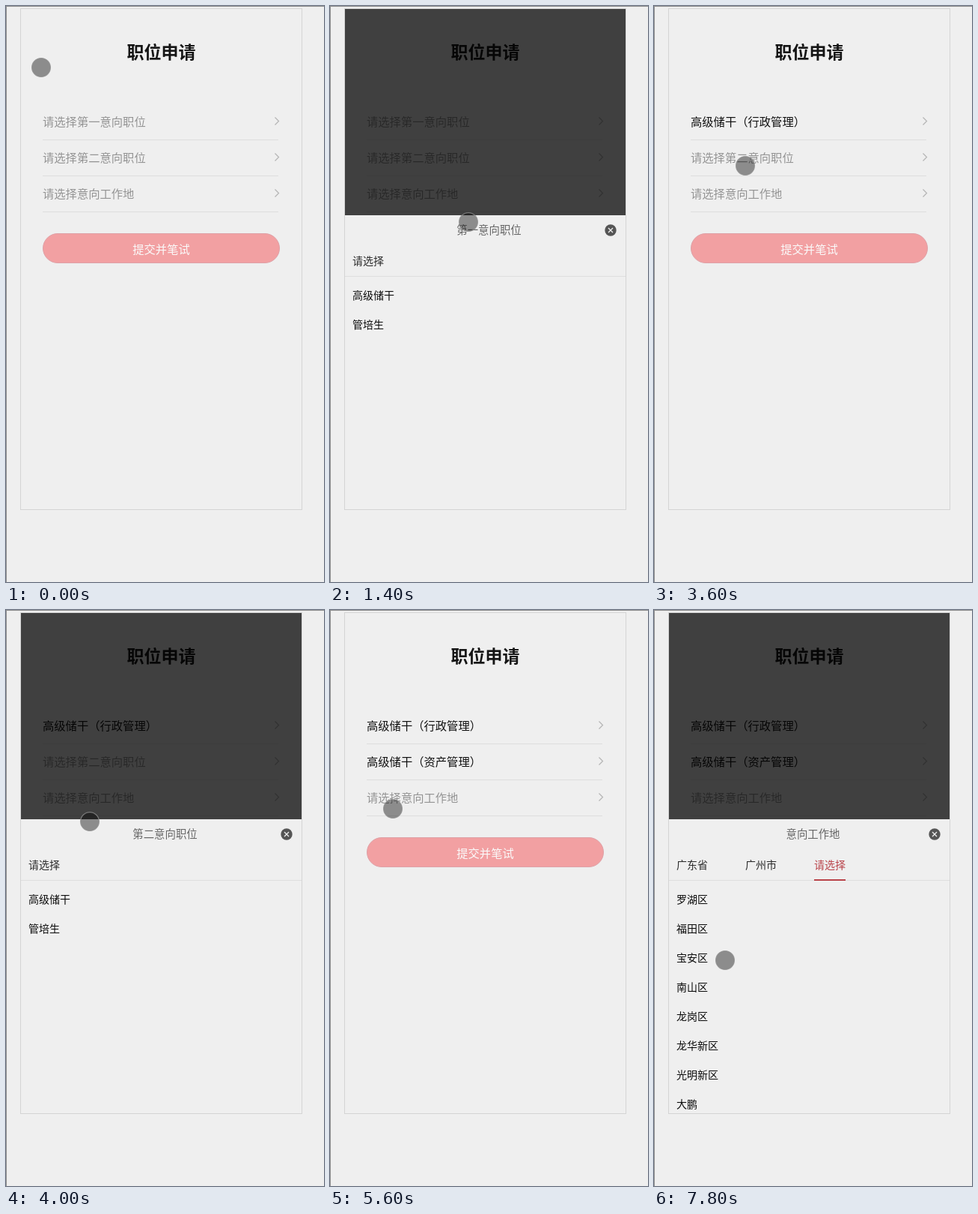
These frames come from a looping animation (425 px wide and 768 px high, 8 s). An HTML page:

```html
<!DOCTYPE html>
<html lang="zh-CN">
<head>
<meta charset="utf-8">
<title>职位申请</title>
<style>
  html, body { margin: 0; width: 100%; height: 100%; overflow: hidden; background: #efefef; }
  svg { display: block; width: 425px; height: 768px; font-family: "Noto Sans CJK SC", "Noto Sans CJK", sans-serif; }
</style>
</head>
<body>
<svg id="stage" viewBox="0 0 425 768">
  <defs><clipPath id="frame"><rect x="20" y="4" width="375" height="667"/></clipPath></defs>
  <rect width="425" height="768" fill="#efefef"/>
  <path d="M0 .5H425M.5 0V768" stroke="#8e8e8e"/>
  <g id="form"></g>
  <g id="picker" clip-path="url(#frame)"></g>
  <rect x="19.5" y="3.5" width="376" height="668" fill="none" stroke="#d4d4d4"/>
  <circle id="touch" r="12.4" fill="#000" fill-opacity=".41" stroke="#8c8c8c" stroke-opacity=".8" stroke-width="1.2"/>
</svg>
<script>
const DURATION = 8000;
const RED = '#b9434a';
const PROMPTS = ['请选择第一意向职位', '请选择第二意向职位', '请选择意向工作地'];
const CHOICES = ['高级储干（行政管理）', '高级储干（资产管理）'];
const GROUPS = ['高级储干', '管培生'];
const JOBS = ['业务', '行政', '人事', '资产', '研发', '法务', '财务'].map(name => name + '管理');
const CITIES = ['深圳', '广州', '惠州', '中山', '揭阳', '珠海', '佛山', '韶光'].map(name => name + '市');
const DISTRICTS = ['罗湖区', '福田区', '宝安区', '南山区', '龙岗区', '龙华新区', '光明新区', '大鹏'];

const VIEWS = {
  group1: { title: '第一意向职位', tabs: [], items: GROUPS },
  job1: { title: '第一意向职位', tabs: ['高级储干'], items: JOBS },
  group2: { title: '第二意向职位', tabs: [], items: GROUPS },
  job2: { title: '第二意向职位', tabs: ['高级储干'], items: JOBS },
  province: { title: '意向工作地', tabs: [], items: ['广东省'] },
  city: { title: '意向工作地', tabs: ['广东省'], items: CITIES },
  district: { title: '意向工作地', tabs: ['广东省', '广州市'], items: DISTRICTS }
};

// time, touch x, touch y, open view, filled rows
const STEPS = [
  [0, 47, 82, '', 0], [200, 43, 52, '', 0], [400, 41, 22, '', 0],
  [600, 85, 62, '', 0], [800, 146, 130, '', 0], [1000, 170, 170, '', 0],
  [1400, 185, 288, 'group1', 0], [1600, 140, 345, 'group1', 0],
  [1800, 88, 386, 'group1', 0], [2000, 76, 393, 'job1', 0],
  [2200, 75, 412, 'job1', 0], [2400, 76, 430, 'job1', 0],
  [2600, 76, 432, 'job1', 0], [2800, 78, 425, '', 1],
  [3000, 88, 372, '', 1], [3200, 104, 296, '', 1],
  [3400, 117, 236, '', 1], [3600, 122, 213, '', 1],
  [3800, 122, 218, 'group2', 1], [4000, 112, 282, 'group2', 1],
  [4200, 92, 358, 'group2', 1], [4400, 82, 390, 'group2', 1],
  [4600, 81, 400, 'job2', 1], [4800, 82, 470, 'job2', 1],
  [5000, 82, 525, 'job2', 1], [5200, 78, 510, 'job2', 1],
  [5400, 80, 400, '', 2], [5600, 84, 265, '', 2],
  [6000, 84, 275, 'province', 2], [6200, 80, 340, 'province', 2],
  [6400, 74, 388, 'province', 2], [6600, 73, 400, 'city', 2],
  [6800, 74, 437, 'city', 2], [7000, 73, 434, 'city', 2],
  [7200, 74, 433, 'district', 2], [7400, 80, 442, 'district', 2],
  [7600, 89, 456, 'district', 2], [7800, 95, 467, 'district', 2]
];

// middle is the optical centre of the glyphs
function label(text, x, middle, size, fill, extra = '') {
  const baseline = middle + size * 0.38;
  return `<text x="${x}" y="${baseline}" font-size="${size}" fill="${fill}" ${extra}>${text}</text>`;
}

const centred = 'text-anchor="middle"';

function drawForm(filled) {
  const rows = PROMPTS.map((prompt, i) => {
    const y = 154.5 + i * 48;
    const done = i < filled;
    return label(done ? CHOICES[i] : prompt, 49, y, 15.3, done ? '#111' : '#949494') +
      `<path d="M49 ${y + 24}H364" stroke="#dedede"/>` +
      `<path d="M359.5 ${y - 6}l5 5l-5 5" fill="none" stroke="#b4b4b4" stroke-width="1.2"/>`;
  }).join('');
  return label('职位申请', 207.5, 61, 23, '#151515', centred + ' font-weight="700"') + rows +
    '<rect x="49.5" y="303.5" width="316" height="39" rx="19.5" fill="#f2a0a2" stroke="#dfa0a6"/>' +
    label('提交并笔试', 207.5, 324, 15.3, '#fafafa', centred);
}

function drawPicker(view) {
  if (!view) return '';
  let x = 30;
  const tabs = [...view.tabs, '请选择'].map((tab, i) => {
    const active = i > 0 && i === view.tabs.length;
    const width = tab.length * 14;
    const mark = active ? `<rect x="${x}" y="359" width="${width}" height="2" fill="${RED}"/>` : '';
    const out = label(tab, x, 340, 14, active ? RED : '#2b2b2b') + mark;
    x += width + 50;
    return out;
  }).join('');
  const items = view.items.map((item, i) => label(item, 30, 386 + i * 39, 14, '#0c0c0c')).join('');
  return '<rect x="20" y="4" width="375" height="275" fill="#000" fill-opacity=".73"/>' +
    '<rect x="20" y="279" width="375" height="392" fill="#efefef"/>' +
    label(view.title, 212.5, 299, 14.4, '#666', centred) +
    '<circle cx="375" cy="299" r="7.7" fill="#555"/>' +
    '<path d="M372 296l6 6m0-6l-6 6" stroke="#f4f4f4" stroke-width="1.2"/>' +
    '<path d="M20 360.5H395" stroke="#dedede"/>' + tabs + items;
}

const [form, picker, touch] = ['form', 'picker', 'touch'].map(id => document.getElementById(id));
const start = performance.now();
let current;

function render() {
  const time = (performance.now() - start) % DURATION;
  const step = STEPS.findLast(([at]) => at <= time);
  if (step !== current) {
    const [, x, y, view, filled] = current = step;
    form.innerHTML = drawForm(filled);
    picker.innerHTML = drawPicker(VIEWS[view]);
    touch.setAttribute('cx', x);
    touch.setAttribute('cy', y);
  }
  requestAnimationFrame(render);
}
render();
</script>
</body>
</html>
```
